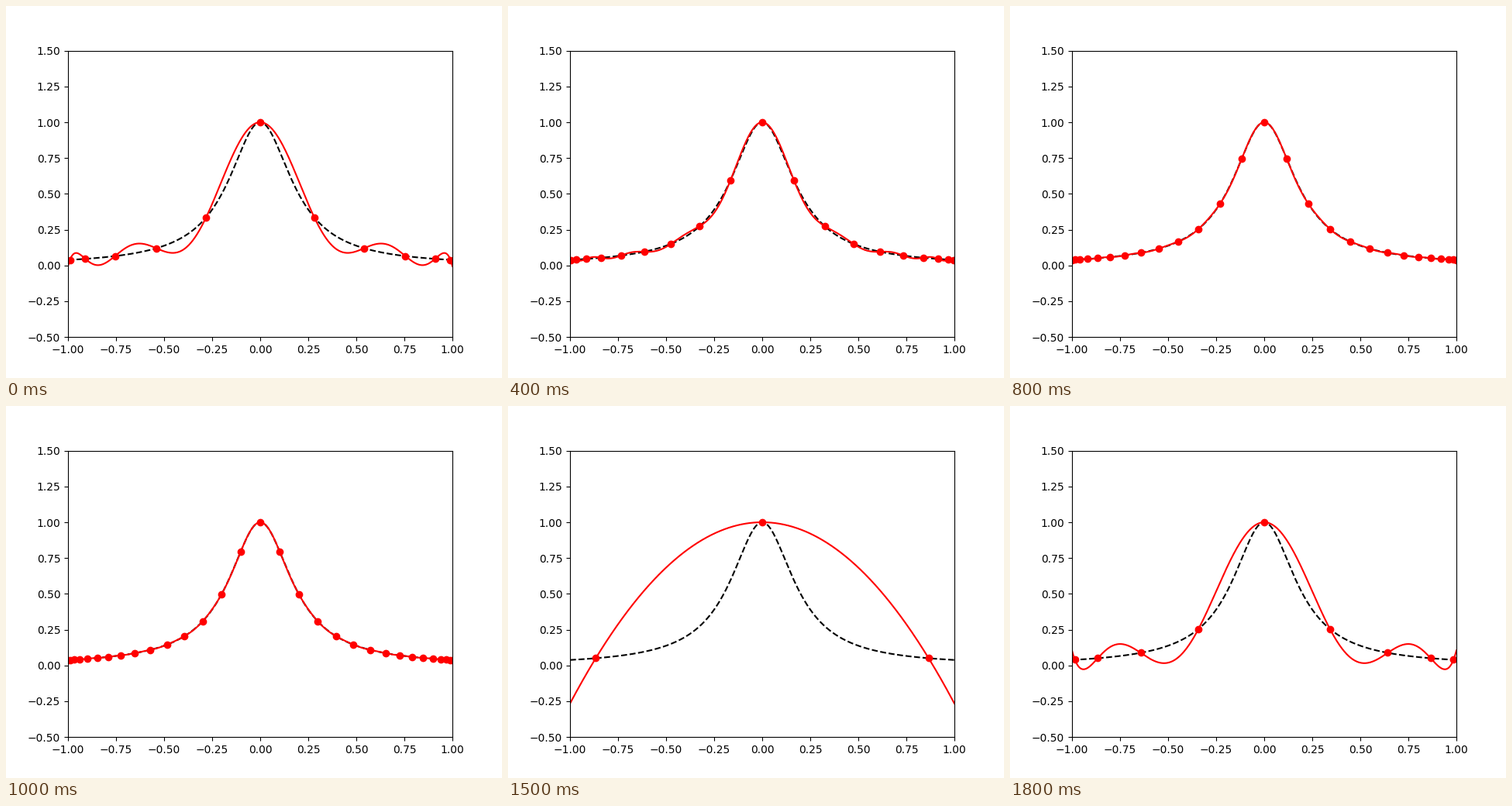
Recreate the animation shown at these times as a matplotlib script. Size 640x480 px, loop 1900 ms.

```python
import numpy as np
import matplotlib.pyplot as plt
from matplotlib.animation import FuncAnimation
from numpy.polynomial import chebyshev as cheb

FRAMES = 19
INTERVAL = 100
START = 5  # the loop opens on 11 nodes and wraps from 37 back to 1


def runge(x):
    return 1 / (1 + 25 * x**2)


fig, ax = plt.subplots(figsize=(6.4, 4.8), dpi=100)
ax.set_xlim(-1, 1)
ax.set_ylim(-0.5, 1.5)

x = np.linspace(-1, 1, 1001)
ax.plot(x, runge(x), "k--")
curve, = ax.plot([], [], "r-")
dots, = ax.plot([], [], "ro")


def update(frame):
    count = 2 * ((frame + START) % FRAMES) + 1
    nodes = cheb.chebpts1(count)
    coefs = cheb.chebinterpolate(runge, count - 1)
    curve.set_data(x, cheb.chebval(x, coefs) + 0 * x)
    dots.set_data(nodes, runge(nodes))
    return curve, dots


anim = FuncAnimation(fig, update, frames=FRAMES, interval=INTERVAL, repeat=True)
plt.show()
```
